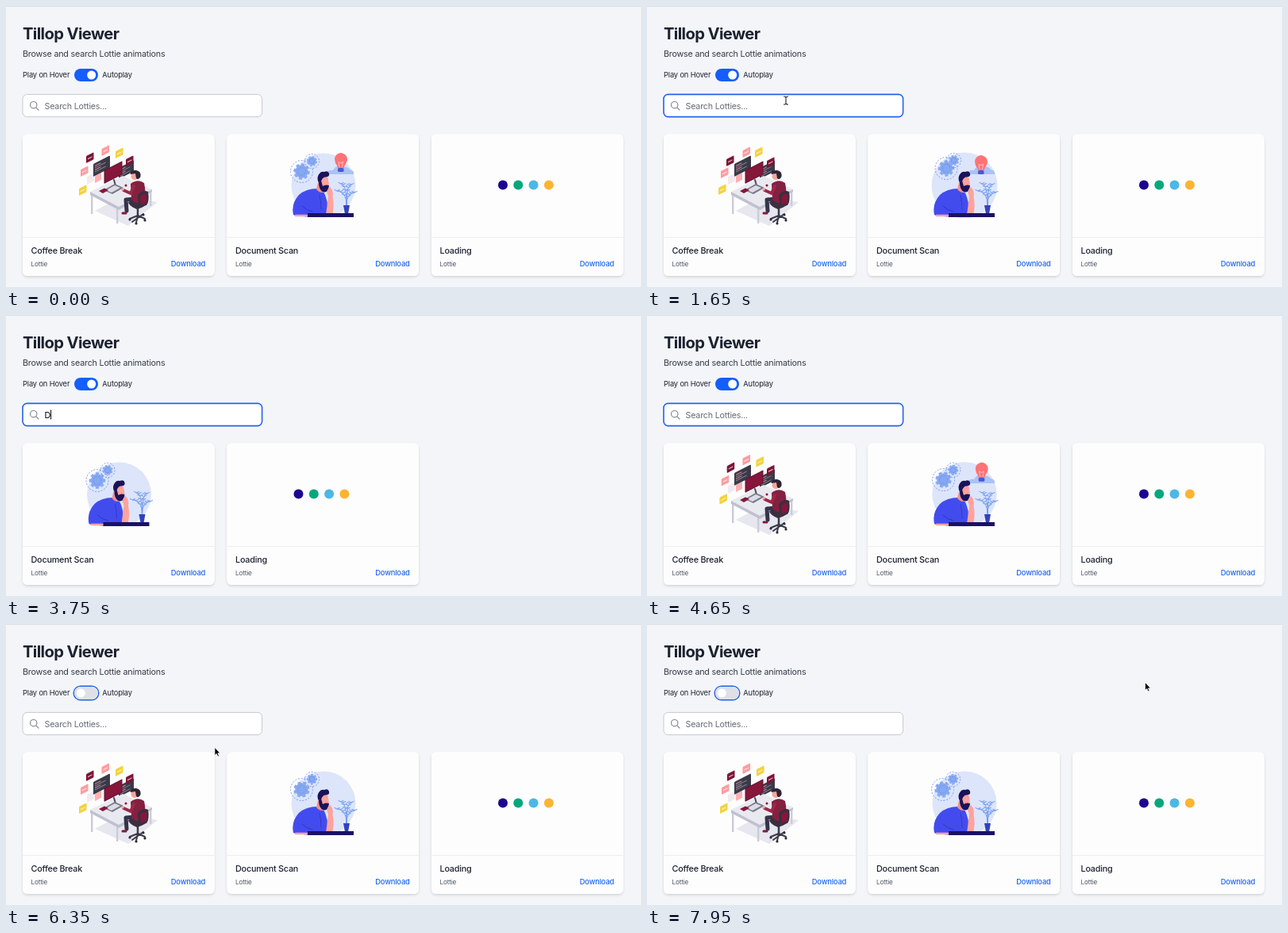
An HTML page for the animation above (8000 ms loop, 800 by 354 pixels).

```html
<!DOCTYPE html>
<html lang="en">
<head>
<meta charset="utf-8">
<title>Animation viewer</title>
<style>
  html, body { margin: 0; width: 100%; height: 100%; overflow: hidden; background: #f4f5f8; }
  svg { display: block; width: 100vw; height: 100vh; }
  text { font-family: Inter, "Open Sans", sans-serif; letter-spacing: -.02em; fill: #1b2230; white-space: pre; }
  .h1 { font-size: 20.2px; font-weight: 700; letter-spacing: -.03em; }
  .body { font-size: 10.75px; }
  .label { font-size: 9.3px; letter-spacing: -.015em; }
  .name { font-size: 10.8px; font-weight: 500; }
  .tag { font-size: 8.2px; fill: #4f5663; }
  .link { font-size: 9.4px; font-weight: 500; fill: #1f66ee; text-anchor: end; }
</style>
</head>
<body>
<svg id="stage" viewBox="0 0 800 354" preserveAspectRatio="none"></svg>
<script>
const LOOP = 8000;
const FOCUS = 1100, CLEAR = 4050, OFF = 5800, HOVER = 6500, LEAVE = 7700;
const BLUE = '#2563eb';
const PITCH = 257.5;

// Search text over time
const typing = [[0, ''], [2150, 'D'], [2380, 'Do'], [2650, 'Doc'], [3480, 'Do'], [3650, 'D'], [CLEAR, '']];
// Pointer stops: time, x, y
const path = [[450, 470, 152], [1000, 175, 119], [4700, 175, 119], [5300, 106, 84], [6100, 106, 84],
  [6600, 418, 226], [7150, 410, 214], [7640, 410, 214], [7880, 627.5, 73.5]];

const clamp = v => Math.max(0, Math.min(1, v));
const ease = v => { v = clamp(v); return v * v * (3 - 2 * v); };
const ramp = (t, a, b) => ease((t - a) / (b - a));
const mix = (a, b, k) => a + (b - a) * k;

const rect = (x, y, w, h, fill, more = '') => `<rect x="${x}" y="${y}" width="${w}" height="${h}" fill="${fill}" ${more}/>`;
const circle = (x, y, r, fill, more = '') => `<circle cx="${x}" cy="${y}" r="${r}" fill="${fill}" ${more}/>`;
const shape = (d, fill, more = '') => `<path d="${d}" fill="${fill}" ${more}/>`;
const line = (d, color, w) => `<path d="${d}" fill="none" stroke="${color}" stroke-width="${w}" stroke-linecap="round" stroke-linejoin="round"/>`;
const text = (x, y, cls, s, more = '') => `<text x="${x}" y="${y}" class="${cls}" ${more}>${s}</text>`;

// Panel seen in isometric view
const panel = (x, y, w, h, fill, inner = '') =>
  `<g transform="translate(${x} ${y}) skewY(-27)">${rect(0, 0, w, h, fill, 'rx="1"')}${inner}</g>`;
const codeLines = w => [3, 5.5, 8, 10.5].map((y, i) =>
  rect(2, y, w * (.35 + .3 * (i % 2)), .9, i % 2 ? '#8e8ea2' : '#f08a92')).join('');

// Floating tiles: x, y, dx, dy, colour
const tiles = [
  [101, 189, -1, 4, '#7d1536'], [120.5, 180, 0, 2, '#ff9c9f'], [138, 183, -2, -1, '#f3d33c'],
  [94, 206, -1, 2, '#ff9c9f'], [92, 230, -2, -1, '#f3d33c'], [151, 193, 0, 2, '#7d1536']];

function coffeeArt() {
  const legs = [[107, 237, 25], [139, 254, 20], [181, 233, 19]].map(([x, y, h]) => rect(x, y, 2.4, h, '#cbccd8')).join('');
  return shape('M112 258 L146 240 L191 247 L154 277 Z', '#e6e7ef')
    + panel(102, 215, 9, 10, '#f3e9ee') + panel(112, 214, 8, 9, '#ffb0b0')
    + panel(110, 199, 21, 16, '#3b3a48', codeLines(21))
    + panel(142, 204, 19, 14, '#3b3a48', codeLines(19))
    + tiles.map(t => `<g class="tile">${panel(t[0], t[1], 9.5, 9, t[4], rect(2, 4, 5.5, 1.4, '#fff', 'opacity=".65"'))}</g>`).join('')
    + legs
    + shape('M106 234 L147 214 L184 231 L142 253 Z', '#e9eaf0')
    + shape('M106 234 L142 253 L184 231 V234 L142 257 L106 238 Z', '#c0c1d0')
    + panel(123.5, 207, 23, 17, '#5d1430') + panel(124.5, 207.5, 21, 15, '#86163a')
    + line('M136 219 L138 226', '#4c4b5a', 2)
    + shape('M123 232 L137 224 L148 229 L134 237 Z', '#777888') + shape('M126 232 L137 226 L144 229 L133 235 Z', '#dcdce6')
    + shape('M117 233 L124 229.5 L129 232 L122 236 Z', '#86163a') + circle(151, 226, 1.5, '#86163a')
    + line('M163 243 L151 244 L152 258', '#34344a', 5) + line('M151 261 h-4', '#86163a', 3)
    + line('M166 252 V266', '#3b3a48', 2.5) + line('M156 268 L166 264 L175 268 M166 264 L164 273 M159 272 L173 262', '#3b3a48', 2)
    + [[156, 269], [164, 274], [175, 270], [173, 263]].map(p => circle(...p, 1.6, '#2c2b38')).join('')
    + shape('M154 247 L167 241 L178 247 Q177 253 165 256 Q156 253 154 247 Z', '#3b2f3f')
    + shape('M157 224 Q166 217 174 223 Q177 236 174 248 Q164 250 158 244 Z', '#842040')
    + line('M161 227 L157 236 L148 232', '#9c2748', 4) + circle(147, 231, 1.8, '#f4a79b')
    + shape('M166 238 Q173 231 179 234 Q181 246 177 251 L167 253 Z', '#3b2f3f')
    + shape('M169 240 Q174 235 177 237 V248 L170 250 Z', '#86163a')
    + circle(162, 214.5, 4.6, '#f4a79b')
    + shape('M156.5 212 Q157 206.500 164 207 Q170.500 208 169.500 215 Q167 220 164 217 L163 211 Z', '#2e2436');
}

const gear = (r, cls) => `<g class="${cls}">`
  + circle(0, 0, r * 1.4, 'none', 'stroke="#5f87ea" stroke-width=".8" stroke-dasharray="2 1.8"')
  + `<g class="spin">${circle(0, 0, r * .82, '#86a8f2')}`
  + circle(0, 0, r * .9, 'none', `stroke="#86a8f2" stroke-width="${r * .24}" pathLength="24" stroke-dasharray="1.7 1.3"`)
  + circle(0, 0, r * .5, 'none', 'stroke="#7599ee" stroke-width=".8"') + '</g></g>';

// Stem with small paired leaves, bending out from the pot
function frond([x, y]) {
  const at = k => [429 + x * k * k, 251 + y * (2 * k - k * k)];
  const leaves = [.45, .62, .8, 1].map(k => {
    const [px, py] = at(k);
    return line(`M${px - 3} ${py - 1.5} L${px} ${py} L${px + 3} ${py - 1.5}`, '#83a9f1', 1.3);
  }).join('');
  return line(`M429 251 Q429 ${251 + y} ${429 + x} ${251 + y}`, '#6f97ee', .9) + leaves;
}

function documentArt() {
  const plant = [[-12, -18], [-7, -27], [6, -26], [10, -16]].map(frond).join('');
  return circle(400, 226, 41, '#dde5fb', 'class="disc"')
    + '<g class="cast">' + gear(10, 'big') + gear(6.5, 'small')
    + '<g class="idea">' + shape('M404 212 Q405 206 412 207 Q416 199 424 203 Q430 201 433 206 Q439 207 438 212 Z', '#a9c2f7')
    + '<g class="bulb">' + shape('M414 193 A8 8 0 1 1 429 197 Q427 200 425.5 204 H418 Q417 200 415 198 Z', '#ff7376')
    + line('M420 203 L419 196 L422 198 L424.5 196 L423.5 203', '#ffc0b8', 1)
    + rect(418, 204, 7.5, 5, '#4b57d8', 'rx="1.5"') + '</g></g>'
    + plant + shape('M425 251 H433 L431 262 H427 Z', '#3343bd')
    + shape('M362 263 Q359 249 369 238 Q378 230 392 230 Q401 232 403 241 Q407 252 403 263 L384 266 L364 264 Z', '#424cee')
    + line('M373 252 Q379 258 386 259', '#2f35bd', 1) + line('M395 238 Q397 247 397 256', '#2f35bd', .8)
    + shape('M393 222 L391 231 Q396 237 402 234 L401 226 Z', '#f58f8c')
    + shape('M395 216 Q400 213 405.5 216 L407 225 L402 230 L396 226 Z', '#ffa39c')
    + shape('M394 222 Q394 230 398 233.5 Q403 236 406 232 L407 226 Q402 224.500 399 227 L397 220 Z', '#19135a')
    + shape('M393.500 222 Q391 215 395 211 Q397 208 401 209 Q406 207 407 211 Q408 215 403 215.500 Q399 215 397 221 Z', '#19135a')
    + shape('M403 263 L406 240 L404 234 Q407 226 409 229 Q413 233 411.500 240 Q414 252 411 263 Z', '#ffa39c')
    + line('M365 264 H384', '#ffa39c', 2.6) + rect(380, 261, 58, 5, '#1a1263') + '</g>';
}

const dotsArt = () => ['#1c058f', '#06a77d', '#4db7e5', '#fdb432']
  .map((c, i) => circle(626 + i * 19.3, 225.5, 6, c)).join('');

const items = [
  { name: 'Coffee Break', art: coffeeArt },
  { name: 'Document Scan', art: documentArt },
  { name: 'Loading', art: dotsArt }];

const card = (it, i) => {
  const x = 21 + PITCH * i;
  const base = (fill, more) => rect(x, 161.5, 241.5, 178.5, fill, `rx="6" ${more}`);
  return `<g class="card">
    ${base('#fff', 'filter="url(#low)"')}
    ${base('#fff', 'class="lifted" filter="url(#high)"')}
    ${base('#fdfdfd', '')}
    ${rect(x, 291, 241.5, .8, '#ececef')}
    <g class="art">${it.art()}</g>
    ${text(x + 10.5, 311.7, 'name', it.name)}${text(x + 10.5, 328.4, 'tag', 'Lottie')}
    ${text(x + 230.2, 328.4, 'link', 'Download')}</g>`;
};

const beam = 'M-2.5 -5 Q0 -5 0 -3.5 Q0 -5 2.5 -5 M0 -3.5 V3.5 M-2.5 5 Q0 5 0 3.5 Q0 5 2.5 5';
const stage = document.getElementById('stage');
stage.innerHTML = `
  <defs>
    <filter id="low" x="-10%" y="-10%" width="120%" height="120%"><feDropShadow dx="0" dy="1.5" stdDeviation="1.5" flood-opacity=".15"/></filter>
    <filter id="high" x="-10%" y="-10%" width="120%" height="125%"><feDropShadow dx="0" dy="5" stdDeviation="4.5" flood-opacity=".09"/></filter>
  </defs>
  ${rect(0, 0, 800, 354, '#f4f5f8')}${rect(0, 0, 800, 1, '#dcdee2')}
  ${text(21, 42, 'h1', 'Tillop Viewer')}
  ${text(21, 64, 'body', 'Browse and search Lottie animations', 'style="fill:#343c4a"')}
  ${text(21, 90.3, 'label', 'Play on Hover')}${text(121.3, 90.3, 'label', 'Autoplay')}
  ${rect(85.2, 78.2, 31.6, 17.6, 'none', `rx="8.8" stroke="${BLUE}" stroke-width="1.5" id="ring"`)}
  ${rect(86, 79, 30, 16, '#155dfc', 'rx="8" id="track"')}${circle(107.7, 87, 5.5, '#fff', 'id="knob"')}
  ${rect(21, 111.4, 301.6, 28.2, '#fff', 'rx="5.5" id="field"')}
  ${circle(34.7, 124.7, 4.2, 'none', 'stroke="#858b96" stroke-width="1.2"')}${line('M37.8 127.8 L41 131', '#858b96', 1.2)}
  ${text(48.5, 129.8, 'body', 'Search Lotties...', 'id="hint" style="fill:#666b76"')}
  ${text(48.5, 129.8, 'name', '', 'id="query" style="fill:#000;font-weight:400"')}
  ${rect(0, 119.5, 1, 12, '#000', 'id="caret"')}
  ${items.map(card).join('')}
  <g id="pointer">
    <g id="beam">${line(beam, '#fff', 2.4)}${line(beam, '#222', 1.1)}</g>
    ${shape('M-1.5 0 Q0 -1.5 1.2 0 V4 Q2.5 3 3.4 4.3 Q4.7 3.6 5.3 5 Q6.8 4.8 6.8 6.5 Q7 10 5 12 H-.5 Q-2 9.5 -4 7.5 Q-4 5.5 -1.5 7 Z', '#fff', 'id="hand" stroke="#111" stroke-width=".9"')}
    ${shape('M0 0 V10 L2.3 8 L3.9 11.6 L5.6 10.8 L4 7.4 H7 Z', '#000', 'id="arrow" stroke="#fff" stroke-width=".8"')}
  </g>`;

const el = id => document.getElementById(id);
const set = (node, attrs) => { for (const k in attrs) node.setAttribute(k, attrs[k]); };
const show = (node, on) => set(node, { display: on ? 'inline' : 'none' });
const cards = [...stage.querySelectorAll('.card')];
const [coffee, doc] = cards;
const tileNodes = [...coffee.querySelectorAll('.tile')];
const part = name => doc.querySelector('.' + name);

function drawCoffee(age) {
  const k = (1 - Math.cos(2 * Math.PI * age / 3300)) / 2;
  tileNodes.forEach((n, i) => set(n, { transform: `translate(${tiles[i][2] * k} ${tiles[i][3] * k})` }));
}

function drawDocument(age) {
  const k = ramp(age, 2100, 3400), idea = ramp(age, 1700, 2050);
  const turn = age * .02;
  set(part('disc'), { r: 40.5 + k, opacity: ramp(age, 200, 560) });
  set(part('cast'), { opacity: ramp(age, 330, 600) });
  set(part('big'), { transform: `translate(${372.5 + 4.5 * k} ${208.5 - 4 * k})` });
  set(part('small'), { transform: `translate(${385.5 + k} ${195.5 - k})` });
  doc.querySelectorAll('.spin').forEach((n, i) => set(n, { transform: `rotate(${i ? -turn : turn})` }));
  set(part('idea'), { opacity: idea });
  set(part('bulb'), { transform: `translate(${-k} ${3 * k + 6 * (1 - idea)})` });
}

function drawPointer(t) {
  show(el('pointer'), t >= path[0][0] && (t < 2150 || t >= 4700));
  let i = 0;
  while (i < path.length - 2 && t >= path[i + 1][0]) i++;
  const [a, ax, ay] = path[i], [b, bx, by] = path[i + 1];
  const k = ramp(t, a, b), x = mix(ax, bx, k), y = mix(ay, by, k);
  const inField = x > 21 && x < 323 && y > 111 && y < 140;
  const inToggle = x > 86 && x < 116 && y > 79 && y < 95;
  set(el('pointer'), { transform: `translate(${x} ${y})` });
  show(el('beam'), inField);
  show(el('hand'), inToggle);
  show(el('arrow'), !inField && !inToggle);
}

function draw(t) {
  const [since, query] = typing.filter(s => t >= s[0]).pop();
  const focused = t >= FOCUS && t < OFF;

  set(el('field'), { stroke: focused ? BLUE : '#c6cad2', 'stroke-width': focused ? 1.6 : 1 });
  show(el('hint'), !query);
  el('query').textContent = query;
  const blink = (t - Math.max(since, FOCUS)) % 1000 < 500;
  show(el('caret'), focused && blink);
  set(el('caret'), { x: 48.5 + (query ? el('query').getComputedTextLength() : 0) });

  const off = ramp(t, OFF, OFF + 150);
  set(el('knob'), { cx: mix(107.7, 94.3, off) });
  el('track').style.fill = `rgb(${mix(21, 221, off)},${mix(93, 224, off)},${mix(252, 230, off)})`;
  show(el('ring'), t >= OFF);

  let slot = 0;
  items.forEach((it, i) => {
    const hit = it.name.toLowerCase().includes(query.toLowerCase());
    show(cards[i], hit);
    if (!hit) return;
    const lift = i === 1 ? ramp(t, HOVER, HOVER + 200) - ramp(t, LEAVE, LEAVE + 200) : 0;
    set(cards[i], { transform: `translate(${(slot++ - i) * PITCH} ${-2.7 * lift})` });
    set(cards[i].querySelector('.lifted'), { opacity: lift });
  });

  drawCoffee(t >= OFF ? 0 : t < CLEAR ? t : t - CLEAR);
  const hovered = Math.max(0, Math.min(t, LEAVE) - HOVER);
  drawDocument(t >= OFF ? 600 + hovered * .4 : t < 2150 ? 2100 + t : t - 2150);
  drawPointer(t);
}

function tick() {
  draw(performance.now() % LOOP);
  requestAnimationFrame(tick);
}
tick();
</script>
</body>
</html>
```
